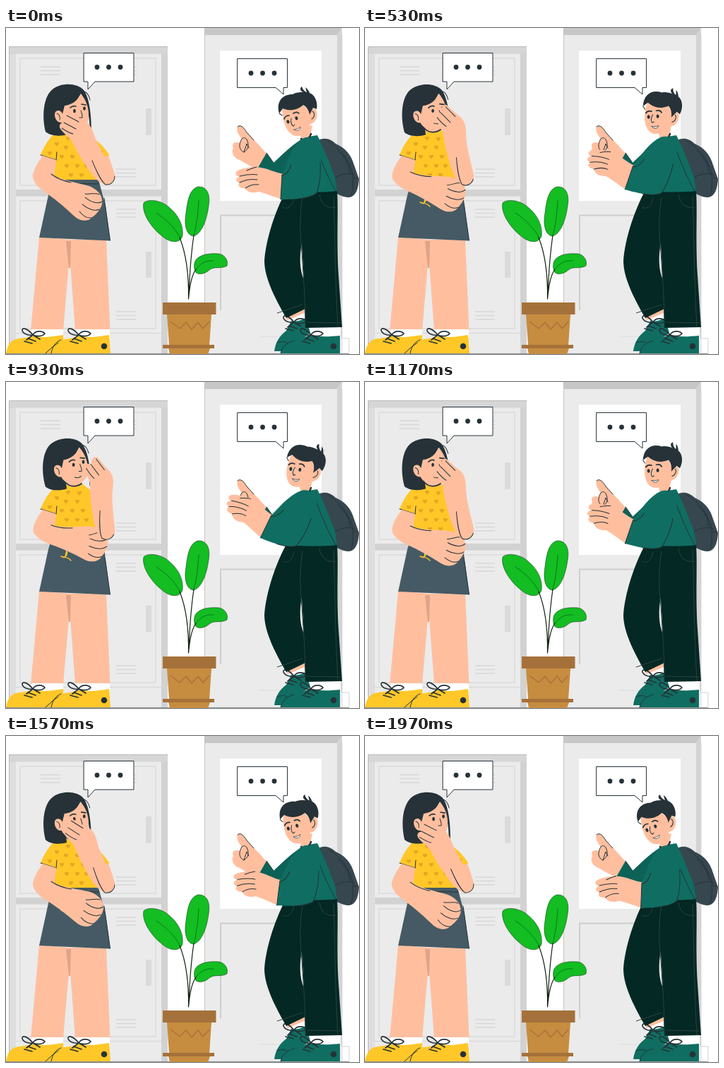
An HTML page for the animation above (2.01 s loop, 500 by 462 pixels).

```html
<!DOCTYPE html>
<html lang="en">
<head>
<meta charset="utf-8">
<title>Hallway chat</title>
<style>
html, body { margin: 0; width: 100%; height: 100%; overflow: hidden; background: #fff }
svg { display: block; width: 100vw; height: 100vh }
.ln { fill: none; stroke: #263238; stroke-width: 1; stroke-linecap: round; stroke-linejoin: round }
.bold { stroke-width: 1.7 }
.skin { fill: #ffbf9f }
.dark { fill: #263238 }
.gold { fill: #ffc727 }
.teal { fill: #0f6e61 }
.pants { fill: #042824 }
.seam { fill: none; stroke: #2a423f; stroke-width: 1 }
.leaf { fill: #13bd22; stroke: #0c2414; stroke-width: .5 }
</style>
</head>
<body>
<svg viewBox="0 0 500 462">
<defs>
  <path id="heart" d="M0 3.2C-5 0-3-4 0-1.6C3-4 5 0 0 3.2Z" fill="#e3a722"/>
  <path id="vent" d="M0 0H28M0 5.5H28M0 11H28" stroke="#d8d8d8" stroke-width="1.6"/>
  <g id="dots" class="dark"><circle r="3.4"/><circle cx="16.5" r="3.4"/><circle cx="33" r="3.4"/></g>
  <path id="laces" class="ln bold" d="M0 0C-7-9-16-12-15-6C-13-1-6 1 0 0C3-6 13-7 17-2C13 3 5 2 0 0L-9 7M0 0L10 6M-7 5L4 9M-12 9L-1 12"/>
</defs>

<!-- lockers -->
<path fill="#dedede" d="M5 26H229V462H5Z"/>
<path fill="#d6d6d6" d="M5 26H229V36H14V37H5Z"/>
<path fill="#d2d2d2" d="M220 36H229V462H220ZM14 229H220V238H14Z"/>
<path fill="#ebebeb" d="M14 37H220V229H14ZM14 239H220V432H14ZM14 433H220V462H14Z"/>
<path fill="none" stroke="#dadada" stroke-width="1.4" d="M20 43H212V223H20ZM20 245H212V426H20ZM14 432.500H220"/>
<path fill="#dadada" d="M198 114H206V152H198ZM198 317H206V354H198Z"/>
<use href="#vent" x="49" y="55"/><use href="#vent" x="156" y="55"/>
<use href="#vent" x="156" y="200"/><use href="#vent" x="156" y="257"/><use href="#vent" x="156" y="402"/>
<path fill="none" stroke="#b9b9b9" d="M4.500 462V26.500H229"/>

<!-- door -->
<path fill="#ebebeb" d="M282 10H477V462H282Z"/>
<path fill="#c7c7c7" d="M282 0H476L469 10H282Z"/>
<path fill="#d3d3d3" d="M476 0V440H469V10Z"/>
<path fill="none" stroke="#d3d3d3" d="M477 440H486V461"/>
<path fill="#fff" d="M303 32H447V245H303Z"/>
<path fill="none" stroke="#cecece" stroke-width="2" d="M304 400V265.500H447"/>
<path fill="none" stroke="#dcdcdc" d="M447 265V437H360"/>
<path fill="none" stroke="#c9c0bd" d="M281.500 0V462"/>
<path fill="none" stroke="#8b9194" d="M0 461.500H486"/>

<!-- speech bubbles -->
<path class="ln" style="fill:#fff" d="M110.500 35.500H181V76H126L116 87V76H110.500Z"/>
<use href="#dots" x="129" y="55.500"/>
<path class="ln" style="fill:#fff" d="M328 43.500H398.500V84.500H393V94L382 84.500H328Z"/>
<use href="#dots" x="347" y="64"/>

<!-- plant -->
<path class="leaf" d="M195 248C200 242 220 243 232 255C244 265 252 280 250 295C246 306 232 305 220 294C205 282 192 262 195 248Z"/>
<path class="leaf" d="M272 225C284 224 290 235 287 252C284 275 276 293 265 295C255 293 252 278 255 262C257 245 260 228 272 225Z"/>
<path class="leaf" d="M268 330C274 320 290 319 302 320C311 322 315 330 313 337C305 342 295 337 288 343C280 350 270 350 268 345C266 340 266 335 268 330Z"/>
<path class="ln" style="stroke:#0a7a18" d="M213 262C228 272 240 284 247 298M273 245C272 262 270 280 266 294M294 330C283 329 276 333 269 342"/>
<path class="ln" style="stroke:#10200f;stroke-width:1.2" d="M246 297C256 322 259 350 258.500 384M266 294C262 320 260 350 258.500 384M269 342C262 352 260 368 258.500 384"/>
<path fill="#c68c3f" d="M228 406H291L288 450H231ZM230 454H289L286 462H232Z"/>
<path fill="#a5713a" d="M222 389H297.500V406H222ZM222 449H295V454H222Z"/>
<path fill="none" stroke="#a5713a" stroke-width="1.3" d="M233 416L246 426L255 417L263 427L272 417L279 426L288 416"/>

<!-- girl, still parts -->
<path class="skin" d="M47 296L92 300L81 429H35ZM86 300H142L147.500 429H98L91 334Z"/>
<path fill="#dfa387" d="M85 302H92L91 340L89 340Z"/>
<path fill="#fff" d="M36 427H81V440H36ZM98 427H147V440H98Z"/>
<path class="gold" d="M0 461C2 450 6 443 14 441C24 439 32 439 40 436C52 440 66 437 81 435V461Z"/>
<path class="gold" d="M64 461C66 451 70 445 78 442C88 440 97 440 104 436C118 440 132 437 146 435L148 461Z"/>
<path class="ln" d="M56 461L66 452L74 446M64 461C66 451 70 445 78 442"/>
<circle class="dark" cx="139" cy="451" r="4.300"/>
<use href="#laces" x="38" y="435"/><use href="#laces" x="103" y="435"/>
<path class="skin" d="M130 182L145 180C149 192 153 202 154 212L136 214Z"/>
<path class="gold" d="M112 150C128 156 138 168 146.500 180L130 187L116 180Z"/>
<path class="gold" d="M67 151C73 145 80 144 87 144H108L119 153C124 172 127 195 131 218L66 216L71 187L49 180C53 170 58 160 67 151Z"/>
<g id="hearts"></g>
<path class="skin" d="M84 130H108V145C100 150 91 150 85 145Z"/>
<path class="ln bold" d="M85 143C91 149 100 149 107 144"/>
<path class="ln" d="M71 187L72 176M49 180L71 187"/>
<path fill="#455a64" d="M67 215H131L141 252L147.500 301.500L47 297L60 237Z"/>
<path class="ln" d="M68 220L132 221M139 241L147.500 301"/>
<path class="ln" style="stroke:#ffc727;stroke-width:1.4" d="M78 247C82 249 87 247 92 253M80 235C90 238 87 246 82 249M86 238L84 247"/>

<g id="girlHead">
  <path class="dark" d="M56 147C50 122 54 95 67 86C80 77 101 78 110 88C117 97 121 118 121 148L118.500 148C119 130 117 112 106 93L84 130L86 151C76 154 63 153 56 147Z"/>
  <path class="skin" d="M106 93C113 102 118 112 117 128C115 139 108 145 98 145C89 145 81 140 79 134C71 135 67 124 70 119C74 115 79 118 80 122L83 110C93 109 102 103 106 93Z"/>
  <path class="ln" d="M72 121C76 122 77 127 76 130M106 117C107 121 109 124 108 127L104 127M98 135C101 137 105 136 107 134M106 93C111 86 117 93 119 102"/>
  <path class="ln bold" d="M91 113C93 111 96 110 99 111M107 108L113 109"/>
  <ellipse class="dark" cx="97" cy="117.500" rx="1.900" ry="2.700"/>
  <ellipse class="dark" cx="111" cy="114" rx="1.900" ry="2.700"/>
</g>
<path class="skin" d="M52 181L71 187L68 212L40 216C35 205 45 191 52 181Z"/>
<g id="girlLow">
  <path class="skin" d="M38 206C36 216 44 226 60 236C74 246 84 255 96 266C104 274 116 275 121 269C130 263 138 252 136 244C136 236 128 228 118 224C100 219 85 217 70 210L60 200Z"/>
  <path class="ln" d="M64 207C72 213 82 217 92 219M136 246C130 250 120 247 112 240M132 257C126 260 116 257 108 250M121 269C114 270 108 265 104 260M112 235C120 236 128 233 132 236"/>
</g>
<g id="girlHigh">
  <path class="skin" d="M86 121C92 123 100 128 110 131C118 135 122 142 125 152C130 168 145 190 153 204C157 214 152 222 141 222C130 220 120 206 110 190C103 180 97 168 92 158C86 152 78 146 76 141C75 136 79 133 84 135C79 130 80 122 86 121Z"/>
  <path class="ln" d="M86 124L103 133M82 134L99 143M79 142C85 146 90 149 95 150M122 188C127 200 133 215 141 222C149 223 154 217 154 210"/>
</g>

<!-- boy, still parts -->
<path fill="#37474f" d="M441 160C450 154 460 157 467 164C481 170 489 180 493 194L500 214C499 230 495 240 484 240C474 239 466 234 463 228Z"/>
<path class="ln" d="M456 160C476 172 488 190 492 212L498 213M491 213C492 224 491 233 488 239M466 212C476 206 486 205 493 208M470 174C482 184 487 196 487 205"/>
<path class="skin" d="M328 140C332 136 337 141 341 148C348 156 360 166 371 181L358 202C348 196 338 192 331 187C323 185 318 176 322 170C319 164 324 160 331 163L334 157C329 151 326 145 328 140Z"/>
<path class="ln" d="M328 140C332 136 337 141 341 148L351 159M334 157C329 165 330 173 337 176C343 172 345 166 341 158C339 155 336 155 334 157M337 176L341 164L344 170"/>
<path fill="#0d6257" d="M418 158C402 168 390 181 379 191L369 177L354 203L368 214L412 214L428 180Z"/>
<path class="ln" d="M369 177L379 191"/>

<path class="skin" d="M396 408L423 396L425 404L399 415Z"/>
<path fill="#fff" d="M399 414L425 403L428 414L402 424ZM425 423H474V440H425Z"/>
<path class="teal" d="M380 458C382 444 388 436 397 429L404 415C411 417 418 414 425 411L431 432L412 446L392 458Z"/>
<path class="teal" d="M389 461C391 451 398 446 408 443C418 440 424 438 431 434C444 439 460 437 473 436V461Z"/>
<path class="ln" d="M389 461C391 451 398 446 408 443M384 446C390 444 394 444 398 446"/>
<circle class="dark" cx="464" cy="451" r="4.300"/>
<use href="#laces" x="432" y="435"/><use href="#laces" x="408" y="417"/>
<path class="pants" d="M396 232C381 260 368 300 366 330C366 356 384 388 397 411L424 398L425 362C417 350 415 332 418 310L432 250Z"/>
<path class="pants" d="M396 232L469 230C471 260 468 300 471 350L476 424L424 425C423 380 421 320 414 248Z"/>
<path class="seam" d="M420 240C416 262 416 290 419 318C421 350 424 380 424 424M464 238C466 280 465 330 470 424M392 254C400 258 406 252 408 240M444 236C446 250 455 256 467 254M384 404L420 392M426 417L474 418"/>
<path class="teal" d="M417 158C424 155 432 153 441 152C448 166 458 190 466 212L469 231C450 233 428 233 404 231C408 205 408 178 417 158Z"/>
<path class="ln" d="M438 165C446 188 456 212 467 231"/>
<path class="skin" d="M414 142L434 138L431 153C428 159 421 160 418 157Z"/>
<path class="ln" style="stroke-width:2.5" d="M418 157C423 160 430 157 432 150"/>

<g id="boyHead">
  <path class="skin" d="M391 112C391 130 396 146 407 152C417 156 427 148 431 136C439 135 443 124 439 116C436 112 431 114 430 118L416 104Z"/>
  <path class="dark" d="M387 121C382 104 392 94 406 94C411 91 417 91 421 91C416 89 416 85 419 83C420 87 423 90 426 91L424 84C427 86 429 89 430 92C438 95 442 106 440 115L435 113L430 123C429 116 425 111 421 109C412 117 402 118 392 114Z"/>
  <path class="ln" d="M434 118C438 120 437 127 433 129M404 128C403 133 404 137 407 139L409 137M387 121L391 124"/>
  <path class="ln bold" d="M394 129C395 126 398 124 401 124M407 121C410 119 413 119 415 121"/>
  <ellipse class="dark" cx="399.500" cy="133" rx="2" ry="2.700" transform="rotate(-20 399 133)"/>
  <ellipse class="dark" cx="411.500" cy="128" rx="2" ry="2.700" transform="rotate(-20 411 128)"/>
  <path class="ln" style="fill:#fff;stroke-width:.7" d="M408 144C411 144 415 142 417 140C417 145 412 147 408 144Z"/>
</g>
<g id="boyArm">
  <path class="skin" d="M394 207C380 205 370 198 355 197C345 197 333 199 327 203C323 207 327 211 331 210C324 213 325 219 331 219C327 224 332 228 339 227C341 233 350 235 358 232C368 234 380 240 392 243Z"/>
  <path class="ln" d="M331 210C340 208 348 207 356 208M331 219C340 215 348 214 356 215M339 227C345 223 351 221 358 222M355 197C350 198 345 200 341 202"/>
  <path class="teal" d="M418 158C428 151 443 156 445 170C448 192 446 216 440 234C430 242 408 243 389 243L391 208C398 190 404 170 418 158Z"/>
  <path class="ln" d="M391 208L389 243M391 209C398 208 402 200 404 194M445 190C446 210 444 224 440 234C434 239 424 241 414 242"/>
</g>
</svg>
<script>
const PERIOD = 2010, LEAD = 155;
// id: [degrees over half a cycle, pivot x, pivot y]
const joints = {
  girlHead: [-3, 92, 150],
  girlLow: [-20, 48, 205],
  girlHigh: [33, 140, 210],
  boyHead: [36, 421, 136],
  boyArm: [29.5, 430, 160]
};
const el = id => document.getElementById(id);
const swing = t => 1 - Math.abs(1 - 2 * ((t + LEAD) / PERIOD % 1));
const base = swing(0);

const spots = [[88, 156], [72, 164], [104, 157], [62, 177], [85, 169], [101, 169],
  [79, 182], [94, 182], [109, 182], [86, 195], [101, 195], [114, 195], [92, 208], [107, 208], [134, 176]];
el("hearts").innerHTML = spots.map(([x, y]) => `<use href="#heart" x="${x}" y="${y}"/>`).join("");

function draw(t) {
  const d = swing(t) - base;
  for (const [id, [deg, x, y]] of Object.entries(joints))
    el(id).setAttribute("transform", `rotate(${deg * d} ${x} ${y})`);
}
const start = performance.now();
function tick() {
  draw(performance.now() - start);
  requestAnimationFrame(tick);
}
tick();
</script>
</body>
</html>
```
